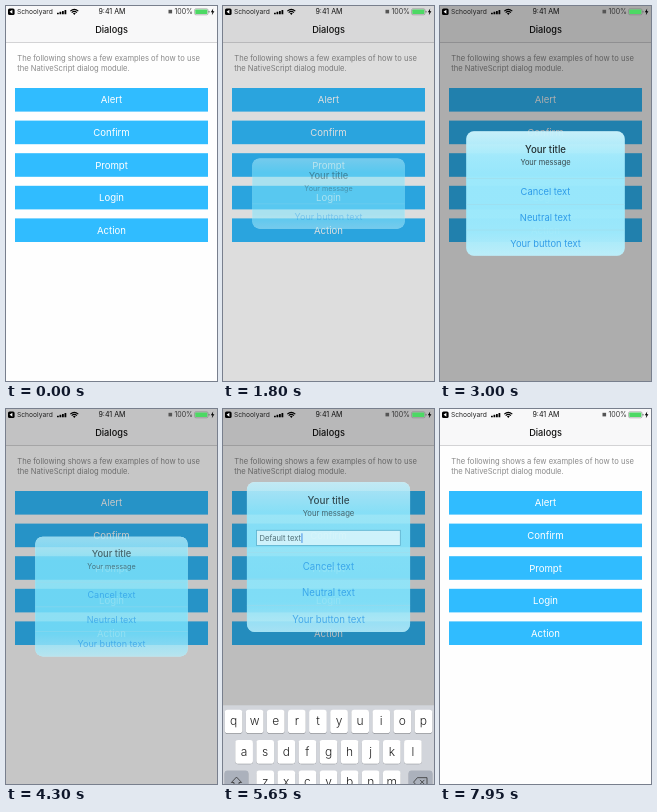
An HTML page for the animation above (8 s loop, 211 by 375 pixels).

```html
<!DOCTYPE html>
<html lang="en">
<head>
<meta charset="utf-8">
<title>Dialogs</title>
<style>
  html, body { margin: 0; width: 100%; height: 100%; overflow: hidden; background: #fefefe; }
  svg { display: block; width: 100%; height: 100%; }
  text { font-family: Inter, Roboto, sans-serif; }
</style>
</head>
<body>
<svg id="stage" viewBox="0 0 211 375"></svg>
<script>
const NS = 'http://www.w3.org/2000/svg';
const stage = document.getElementById('stage');
const LOOP = 8000;
const DIM = 0.4;
const CENTER_Y = 187.5;
const TYPING_Y = 126.5;
const KEYBOARD = { top: 253.5, height: 121.5 };
const ROW = 24.75;
const WIDTH = 152.4;

function add(parent, tag, attrs = {}, content) {
  const node = document.createElementNS(NS, tag);
  for (const name in attrs) node.setAttribute(name, attrs[name]);
  if (content) node.textContent = content;
  parent.append(node);
  return node;
}

const group = (parent = stage) => add(parent, 'g');
const rect = (parent, x, y, width, height, fill, rx = 0) =>
  add(parent, 'rect', { x, y, width, height, fill, rx });
const line = (parent, d, stroke, width = 1) =>
  add(parent, 'path', { d, stroke, 'stroke-width': width, fill: 'none' });

// y is the middle of the capitals
function label(parent, x, y, size, content, fill = '#000', attrs = {}) {
  return add(parent, 'text', {
    x, y: y + size * 0.364, 'font-size': size, fill, 'text-anchor': 'middle', ...attrs
  }, content);
}
const START = { 'text-anchor': 'start' };

// Vertical gradient with evenly spaced stops
function gradient(colors) {
  const id = 'tint' + stage.querySelectorAll('linearGradient').length;
  const node = add(stage, 'linearGradient', { id, x2: 0, y2: 1 });
  colors.forEach((color, i) =>
    add(node, 'stop', { offset: i / (colors.length - 1), 'stop-color': color }));
  return `url(#${id})`;
}

function buildPage() {
  const page = group();
  rect(page, 0, 0, 211, 375, '#fefefe');
  rect(page, 0, 0, 211, 36, '#f8f8f9');
  rect(page, 0, 36, 211, 0.6, '#b8b8bb');
  label(page, 105.5, 23.6, 9.2, 'Dialogs', '#111', { 'font-weight': 500 });
  label(page, 11.3, 52.4, 7.6, 'The following shows a few examples of how to use', '#8a8a8a', START);
  label(page, 11.3, 61.9, 7.6, 'the NativeScript dialog module.', '#8a8a8a', START);
  ['Alert', 'Confirm', 'Prompt', 'Login', 'Action'].forEach((name, i) => {
    const y = 82 + i * 32.6;
    rect(page, 9, y, 193, 23.6, '#30bcff');
    label(page, 105.5, y + 12, 9.6, name, '#fff');
  });
}

function buildStatusBar() {
  const bar = group();
  rect(bar, 2, 2.4, 6.6, 6.6, '#000', 1.6);
  add(bar, 'path', { d: 'M6.4 3.7V7.7L3.6 5.7Z', fill: '#fff' });
  label(bar, 11, 5.8, 6.7, 'Schoolyard', '#222', START);
  for (let i = 0; i < 4; i++) rect(bar, 51 + i * 2.5, 6.7 - i * 0.9, 1.8, 1.6 + i * 0.9, '#000', 0.3);
  line(bar, 'M64.3 5.2Q68.3 1.4 72.3 5.2M65.7 6.7Q68.3 4.2 70.9 6.7', '#000', 1.1);
  add(bar, 'path', { d: 'M66.9 7.3Q68.3 6 69.7 7.3L68.3 8.9Z' });
  label(bar, 106, 5.8, 7.1, '9:41 AM', '#111');
  rect(bar, 162.5, 3.8, 3.6, 3.6, '#555');
  label(bar, 187, 5.8, 7, '100%', '#333', { 'text-anchor': 'end' });
  add(bar, 'rect', { x: 188.6, y: 2.8, width: 13.4, height: 6, rx: 1.3,
    fill: 'none', stroke: '#777', 'stroke-width': 0.5 });
  rect(bar, 189.3, 3.5, 12, 4.6, '#4cd964', 0.7);
  rect(bar, 202.6, 4.8, 0.8, 2, '#777', 0.4);
  add(bar, 'path', { d: 'M207.2 2.6L204.8 6.2H206.4L205.8 9.2L208.4 5.2H206.8Z' });
}

function buildKeyboard() {
  const board = group();
  rect(board, 0, 0, 211, KEYBOARD.height, '#d2d5db');
  const key = (x, row, width, name, size = 12, fill = '#fff') => {
    const y = 4.4 + row * 30.4;
    rect(board, x, y + 0.6, width, 23.6, '#888b91', 2.8);
    rect(board, x, y, width, 23.6, fill, 2.8);
    if (name) label(board, x + width / 2, y + 11.2, size, name, '#222', { 'font-weight': 300 });
  };
  const gray = '#abb1bc';
  ['qwertyuiop', 'asdfghjkl', 'zxcvbnm'].forEach((letters, row) => {
    const left = 105.5 - letters.length * 10.55 + 1.7;
    [...letters].forEach((letter, i) => key(left + i * 21.1, row, 17.7, letter));
  });
  key(1.7, 2, 23.6, '', 0, gray);
  key(185.7, 2, 23.6, '', 0, gray);
  key(1.7, 3, 23.6, '123', 8.4, gray);
  key(28.1, 3, 23.6, '', 0, gray);
  key(54.4, 3, 49.6, 'space', 8.2);
  key(107, 3, 23.6, '@', 9.6);
  key(133.4, 3, 23.6, '.', 9.6);
  key(159.8, 3, 49.5, 'return', 8.2, gray);

  line(board, 'M13.5 71.8L8.4 77.2H11V81.4H16V77.2H18.6Z', '#333', 0.8);
  line(board, 'M190.6 76.8L194.4 72.4H204V81.2H194.4ZM197 74.6L201.4 79M201.4 74.6L197 79', '#333', 0.8);
  add(board, 'circle', { cx: 39.9, cy: 107.4, r: 5.2, fill: 'none', stroke: '#333', 'stroke-width': 0.7 });
  line(board, 'M34.7 107.4H45.1M39.9 102.2V112.6M39.9 102.2Q34.6 107.4 39.9 112.6' +
    'Q45.2 107.4 39.9 102.2M35.8 104.4H44M35.8 110.4H44', '#333', 0.5);
  return board;
}

// Drawn around its own centre so that it scales from there
function buildDialog(buttons, tint, hasInput) {
  const box = group();
  const panel = group(box);
  const content = group(box);
  const head = hasInput ? 66 : 45.5;
  const height = head + buttons.length * ROW;
  const top = -height / 2;

  rect(panel, -WIDTH / 2, top, WIDTH, height, gradient(tint), 7.4);
  const glow = rect(panel, -WIDTH / 2, top, WIDTH, height, glowFill, 7.4);
  label(content, 0, top + 17.2, 9.3, 'Your title', '#000', { 'font-weight': 500 });
  label(content, 0, top + 29.5, 7.2, 'Your message', '#222');
  let caret;
  if (hasInput) {
    add(content, 'rect', { x: -67.3, y: top + 45.2, width: 134.4, height: 14.2,
      fill: '#f8feff', stroke: '#4a9cbc', 'stroke-width': 0.8 });
    label(content, -64.4, top + 52.2, 7.1, 'Default text', '#333', START);
    caret = rect(content, -25.3, top + 48, 1, 9, '#2f6fe0');
  }
  buttons.forEach((name, i) => {
    const y = top + head + i * ROW;
    rect(content, -WIDTH / 2, y - 0.3, WIDTH, 0.6, '#a3d8e6');
    label(content, 0, y + ROW / 2 + 0.2, 9, name, '#148ae4');
  });
  return { box, panel, content, glow, caret };
}

// Critically damped spring from 0 to 1
function spring(ms, rate) {
  if (ms <= 0) return 0;
  const x = ms / 1000 * rate;
  const value = 1 - Math.exp(-x) * (1 + x);
  return value > 0.985 ? 1 : value;
}

buildPage();
const dim = rect(stage, 0, 0, 211, 375, '#000');
buildStatusBar();
const glowFill = gradient(['#b4ecfa', '#7fe6ff', '#7fe6ff', '#7fe6ff', '#7fe6ff', '#b4ecfa']);
const three = ['Cancel text', 'Neutral text', 'Your button text'];
const dialogs = [
  { show: 470, hide: 1510, ...buildDialog(three.slice(2), ['#d6f6fd', '#c3f3fd', '#cbf6ff']) },
  { show: 2770, hide: 4110, ...buildDialog(three, ['#e2faff', '#b4f0ff', '#b4f0ff', '#c4f4ff']) },
  { show: 5481, hide: 7160, typing: true,
    ...buildDialog(three, ['#fbffff', '#d2f7ff', '#baf2ff', '#c6f5ff'], true) }
];
const keyboard = buildKeyboard();

const clamp = v => Math.min(1, Math.max(0, v));
const caretOpacity = t => 1 - clamp((t - 6240) / 110) + clamp((t - 6540) / 110);

function render(t) {
  let shade = 0;
  let raised = 0;
  for (const { show, hide, typing, box, panel, content, glow, caret } of dialogs) {
    const shown = spring(t - show, 13);
    const alpha = shown * (1 - spring(t - hide, 8));
    const y = typing ? CENTER_Y + (TYPING_Y - CENTER_Y) * shown : CENTER_Y;
    box.setAttribute('transform', `translate(105.5 ${y}) scale(${1.2 - 0.2 * shown})`);
    // The panel turns solid sooner than its text and glows cyan while it fades
    panel.setAttribute('opacity', 1 - (1 - alpha) ** 2);
    content.setAttribute('opacity', alpha);
    glow.setAttribute('opacity', clamp(2.2 * (1 - alpha)));
    shade = Math.max(shade, alpha);
    if (typing) {
      raised = alpha;
      caret.setAttribute('opacity', caretOpacity(t));
    }
  }
  dim.setAttribute('opacity', DIM * shade);
  keyboard.setAttribute('transform',
    `translate(0 ${KEYBOARD.top + KEYBOARD.height * (1 - raised) + (raised ? 0 : 2)})`);
}

const begin = performance.now();
function tick() {
  render((performance.now() - begin) % LOOP);
  requestAnimationFrame(tick);
}
tick();
</script>
</body>
</html>
```
